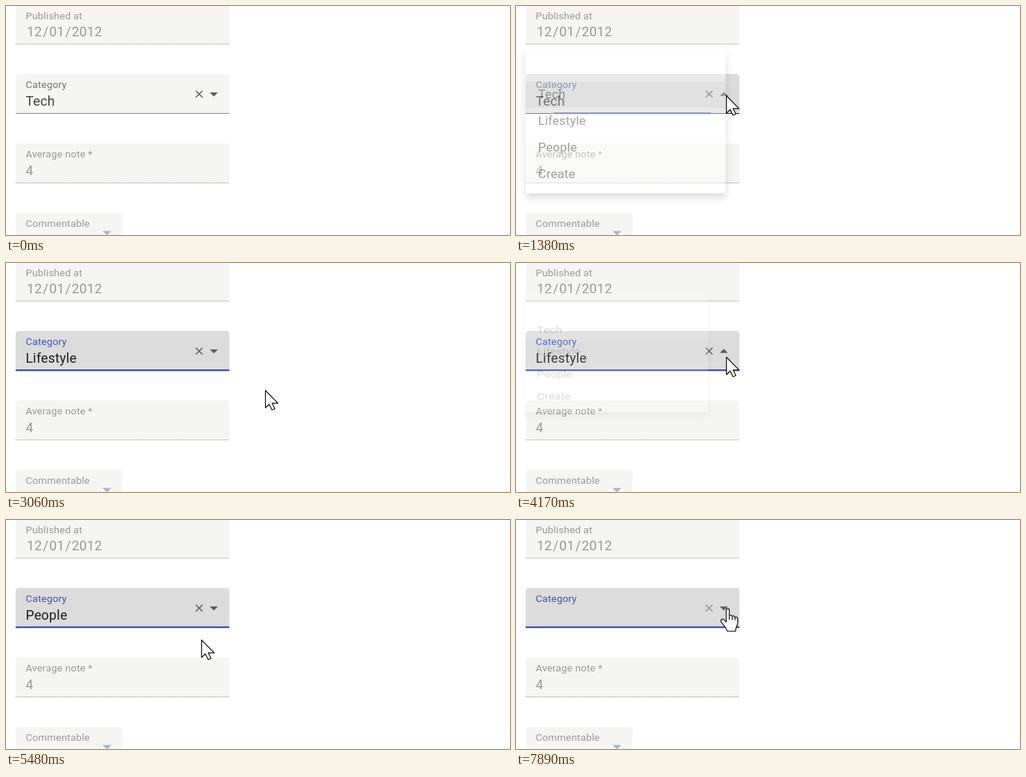
Animation of 679 by 310 pixels, one loop 8 s. Source, as an HTML page:

```html
<!DOCTYPE html>
<html lang="en">
<head>
<meta charset="utf-8">
<title>Category select</title>
<style>
html, body { margin: 0; width: 100%; height: 100%; overflow: hidden; background: #fff; }
body { position: relative; font: 18px Roboto, sans-serif; letter-spacing: .00938em; }
svg { position: absolute; left: 0; top: 0; }
text { white-space: pre; }
.label { font-size: 13.5px; }
.off { fill: #989898; }
.box { fill: #f5f5f4; }
.dots { stroke: #949494; stroke-dasharray: 1 1; }
#menu {
  position: absolute; left: 13px; width: 288px; height: 220.5px; box-sizing: border-box;
  padding: 9px 0; border-radius: 4.5px; background: #fff; color: rgba(0, 0, 0, .87);
  box-shadow: 0 5.6px 5.6px -3.4px rgba(0, 0, 0, .2), 0 9px 11px 1px rgba(0, 0, 0, .14),
    0 3.4px 16px 2.2px rgba(0, 0, 0, .12);
}
#menu div { height: 40.5px; line-height: 40.5px; padding-left: 18px; }
</style>
</head>
<body>
<svg width="679" height="310" viewBox="0 0 679 310">
  <path class="box" d="M13 -2H301V52H13z"/>
  <path class="dots" d="M13 51.5H301"/>
  <text class="label off" x="26.5" y="18">Published at</text>
  <g class="off">
    <text x="28" y="41">12</text><text x="49.8" y="41">/</text>
    <text x="58.2" y="41">01</text><text x="80" y="41">/</text>
    <text x="88.4" y="41">2012</text>
  </g>

  <path id="field" d="M13 146V96.5q0-4.5 4.5-4.5H296.5q4.5 0 4.5 4.5V146z"/>
  <rect id="rule" x="13" y="145" width="288" height="1"/>
  <rect id="focus" y="144" height="2.3" fill="#3f51b5"/>
  <text id="label" class="label" x="26.5" y="111">Category</text>
  <text id="value" x="26.5" y="135"></text>
  <circle id="halo" cx="260.2" cy="119.2" r="13"/>
  <path id="clear" d="M255.7 114.7l9 9m0-9l-9 9" fill="none" stroke-width="1.6"/>
  <path id="caret" fill="#5c5c60"/>

  <path class="box" d="M13 240V190.5q0-4.5 4.5-4.5H296.5q4.5 0 4.5 4.5V240z"/>
  <path class="dots" d="M13 239.5H301"/>
  <text class="label off" x="26.5" y="205">Average note *</text>
  <text class="off" x="26.5" y="229">4</text>

  <path class="box" d="M13 310V284.5q0-4.5 4.5-4.5H152.5q4.5 0 4.5 4.5V310z"/>
  <text class="label off" x="26.5" y="299">Commentable</text>
  <path d="M130 304.5h12l-6 6z" fill="#adb5c9"/>
</svg>

<div id="menu"><div></div><div>Tech</div><div>Lifestyle</div><div>People</div><div>Create</div></div>

<svg width="679" height="310" viewBox="0 0 679 310">
  <g id="cursor" fill="#fff" stroke="#111" stroke-width="1.2" stroke-linejoin="round">
    <path id="arrow" d="M.5 .5V24L5.6 19.2 9.3 27 13.2 25.3 9.6 17.9H17.5z"/>
    <g id="hand" transform="translate(-9 0)">
      <path d="M8.2 19V3a2.1 2.1 0 0 1 4.2 0V10.5c.6-1 3.6-1 4 1c.7-.9 3.4-.8 3.7 1.3c1-.8 3.6-.4 3.6 2V20c0 3-1.5 5-2.3 7.2c-.4 1.2-.4 2.5-.6 4.3H9.5c-.3-2-1.1-3.4-2.3-5L1.7 19.3c-1.1-1.6-.9-3.4.6-3.9c1.7-.6 3 .2 4 1.5z"/>
      <path d="M12.4 10.5V16M16.4 11.5V16M20.1 12.8V16.5" fill="none"/>
    </g>
  </g>
</svg>

<script>
const LOOP = 8000, GROW = 288;
const $ = id => document.getElementById(id);
const clamp = v => Math.min(1, Math.max(0, v));
const span = (t, start, length) => clamp((t - start) / length);
const mix = (a, b, k) => a + (b - a) * k;
const rgb = (a, b, k) => `rgb(${a.map((v, i) => Math.round(mix(v, b[i], k)))})`;

// CSS-style cubic bezier easing, solved by bisection
const bezier = (x1, y1, x2, y2) => x => {
  const at = (a, b, s) => 3 * a * s * (1 - s) ** 2 + 3 * b * s * s * (1 - s) + s ** 3;
  let lo = 0, hi = 1;
  for (let i = 0; i < 24; i++) {
    const mid = (lo + hi) / 2;
    if (at(x1, x2, mid) < x) lo = mid; else hi = mid;
  }
  return at(y1, y2, (lo + hi) / 2);
};
const standard = bezier(.4, 0, .2, 1);
const easeOut = bezier(0, 0, .2, 1);
const drift = bezier(.3, .1, .5, 1);

// Pointer tip: time, x, y
const route = [
  [200, 537, 281], [970, 283, 122], [1020, 283, 122], [1070, 283, 121],
  [1950, 283, 121], [2100, 258, 143], [2350, 258, 162],
  [2720, 258, 162], [3060, 349, 172],
  [3290, 349, 172], [3960, 283, 127],
  [4580, 283, 127], [4880, 262, 162],
  [5450, 262, 162], [5900, 286, 163],
  [5970, 286, 163], [6510, 259, 124], [6610, 259, 124], [6660, 258, 124],
  [6830, 258, 124], [7080, 289, 143],
  [7440, 289, 143], [7890, 284, 119]
];

const menus = [
  { open: 1290, close: 2610, top: 50.3, origin: 70, picked: 1, hover: 2, hoverAt: 2100 },
  { open: 4110, close: 5130, top: 9.8, origin: 110, picked: 2, hover: 3, hoverAt: 4730 }
];
const rows = [...$('menu').children];

function pointer(t) {
  let i = 0;
  while (i < route.length - 2 && t >= route[i + 1][0]) i++;
  const [a, x, y] = route[i], [b, x2, y2] = route[i + 1];
  const k = drift(span(t, a, b - a));
  return [mix(x, x2, k), mix(y, y2, k)];
}

function drawMenu(t) {
  const m = menus.find(m => t >= m.open && t < m.close + GROW);
  $('menu').style.display = m ? 'block' : 'none';
  if (!m) return;
  const closing = t >= m.close;
  const fade = closing ? 1 - standard(span(t, m.close, GROW)) : standard(span(t, m.open, GROW));
  const grow = closing
    ? 1 - standard(span(t, m.close + GROW / 3, GROW * 2 / 3))
    : standard(span(t, m.open, GROW * 2 / 3));
  Object.assign($('menu').style, {
    top: m.top + 'px',
    opacity: fade,
    transformOrigin: `0 ${m.origin}px`,
    transform: grow === 1 ? 'none' : `scale(${mix(.75, 1, grow)}, ${mix(.5625, 1, grow)})`
  });
  const tint = .043 * standard(span(t, m.hoverAt, 150));
  rows.forEach((row, i) => {
    const alpha = i === m.picked ? .085 : i === m.hover ? tint : 0;
    row.style.background = `rgba(0,0,0,${alpha})`;
  });
}

function drawField(t) {
  const hover = standard(span(t, 780, 200));
  const lit = standard(span(t, 1290, 200));
  const line = easeOut(span(t, 1305, 200));
  $('field').setAttribute('fill', rgb([245, 245, 244], [220, 220, 220], hover));
  $('rule').setAttribute('fill', rgb([141, 141, 141], [45, 45, 45], hover));
  $('focus').setAttribute('x', 157 - 144 * line);
  $('focus').setAttribute('width', 288 * line);
  $('label').setAttribute('fill', rgb([113, 113, 113], [63, 81, 181], lit));
  $('value').setAttribute('fill', rgb([64, 64, 64], [29, 29, 32], hover));
  $('value').textContent = t < 2610 ? 'Tech' : t < 5130 ? 'Lifestyle' : t < 6830 ? 'People' : '';

  const halo = standard(span(t, 6300, 150)) - standard(span(t, 6880, 150));
  $('halo').setAttribute('fill', `rgba(0,0,0,${.06 * halo})`);
  $('clear').setAttribute('stroke', t < 6830 ? '#616161' : '#989898');
  const up = menus.some(m => t >= m.open && t < m.close);
  $('caret').setAttribute('d', up ? 'M274.5 121.8h11l-5.5-5.5z' : 'M274.5 117h11l-5.5 5.5z');
}

function drawCursor(t) {
  const [x, y] = pointer(t);
  const blocked = menus.some(m =>
    (t >= m.open - 20 && t < m.open + 220) || (t >= m.close && t < m.close + GROW));
  const inMenu = menus.some(m => t >= m.open && t < m.close);
  const inField = x < 301 && y > 92 && y < 146;
  const hand = !blocked && (inMenu || inField);
  $('cursor').style.display = t >= 200 ? 'inline' : 'none';
  $('cursor').setAttribute('transform', `translate(${Math.round(x)} ${Math.round(y)})`);
  $('hand').style.display = hand ? 'inline' : 'none';
  $('arrow').style.display = hand ? 'none' : 'inline';
}

function draw(t) {
  drawField(t);
  drawMenu(t);
  drawCursor(t);
}

const start = performance.now();
function tick() {
  draw((performance.now() - start) % LOOP);
  requestAnimationFrame(tick);
}
draw(0);
requestAnimationFrame(tick);
</script>
</body>
</html>
```
